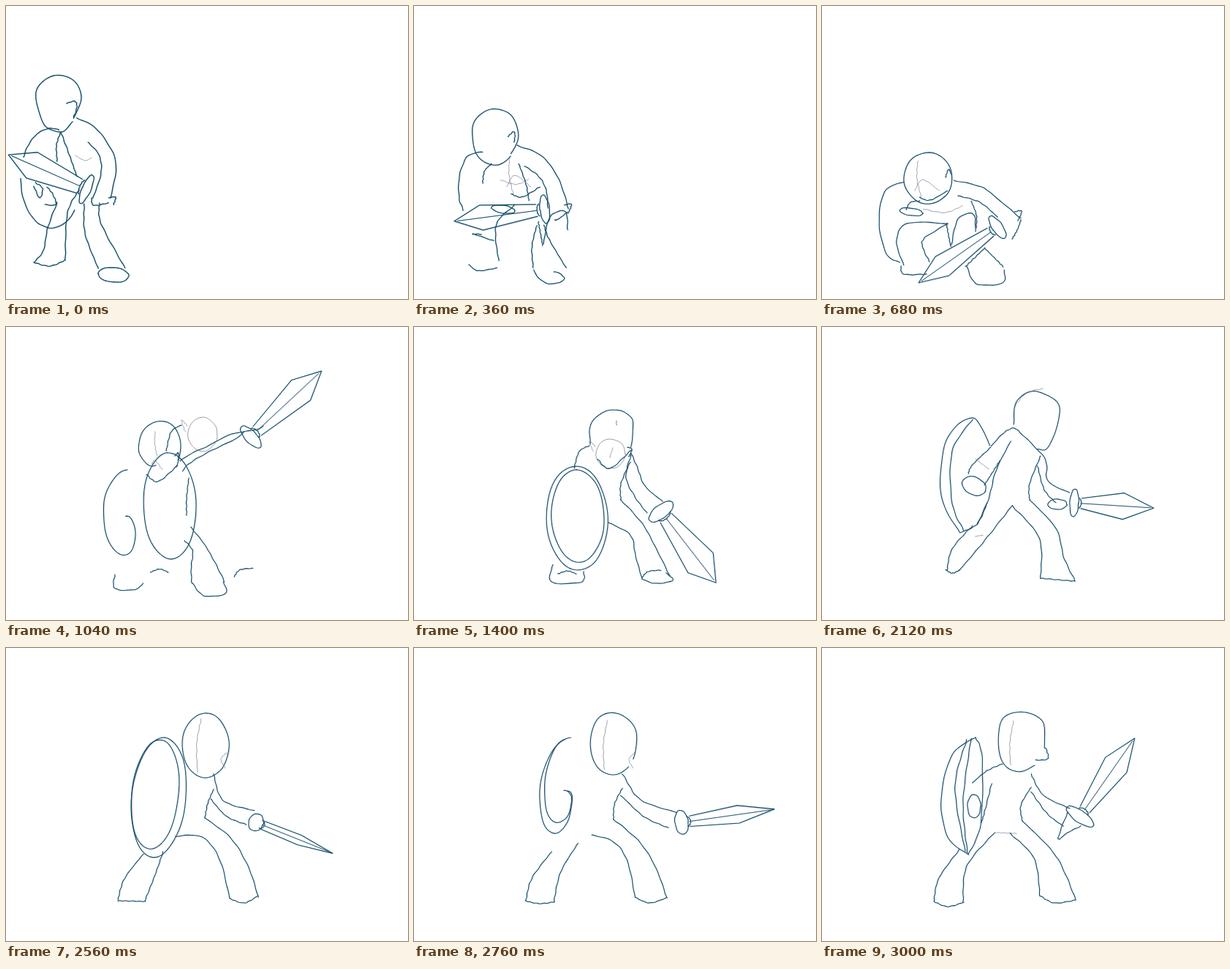
Write an HTML page with a canvas that moves like this. It is 550 px wide and 400 px high and loops after 3.16 s.

```html
<!DOCTYPE html>
<html lang="en">
<head>
<meta charset="utf-8">
<title>Sword and shield sketch</title>
<style>
html, body { margin: 0; width: 100%; height: 100%; overflow: hidden; background: #fff; }
canvas { display: block; width: 550px; height: 400px; }
</style>
</head>
<body>
<canvas id="stage" width="550" height="400"></canvas>
<script>
const LOOP = 3160;
const SAMPLES = 60;
const GROUND = 350;
const ctx = document.getElementById('stage').getContext('2d');

// Moments at which a new drawing replaces the last one.
const STEPS = [0, 120, 240, 360, 480, 600, 680, 800, 880, 960, 1040, 1160,
  1240, 1320, 1400, 1480, 1560, 1640, 1720, 1800, 1880, 2000, 2120, 2240,
  2360, 2440, 2560, 2680, 2760, 2840, 2920, 3000];

// time, hilt x, hilt y, tip x, tip y
const SWING = [
  [0, 110, 250, 3, 203], [680, 240, 302, 132, 378], [880, 272, 225, 215, 110],
  [960, 292, 150, 330, 24], [1040, 335, 150, 432, 60], [1160, 352, 182, 470, 172],
  [1240, 350, 205, 465, 246], [1400, 338, 252, 413, 349], [1720, 345, 245, 449, 292],
  [1880, 352, 242, 467, 270], [2120, 345, 240, 454, 247], [2560, 342, 238, 447, 280],
  [2760, 366, 238, 493, 220], [2840, 360, 236, 453, 180], [3000, 353, 230, 428, 123]];

// time, base half width, belly half width, belly position, guard length, guard depth
const BLADE = [
  [0, 10, 19, 0.7, 21, 6], [680, 7, 16, 0.7, 18, 7], [1400, 10, 22, 0.72, 20, 9],
  [1720, 9, 14, 0.67, 14, 7], [2120, 7, 18, 0.62, 19, 6], [2560, 6, 7, 0.57, 12, 10],
  [3000, 8, 18, 0.66, 22, 8]];

// time, vertical stretch of the body above the ground
const STRETCH = [[0, 1], [240, 1.07], [680, 1], [1160, 1.2], [1400, 1],
  [1560, 1.05], [1720, 1], [3000, 1]];

const mix = (a, b, u) => a + (b - a) * u;

// Neighbouring rows around a time, and the progress between them.
function around(rows, t) {
  let i = rows.length - 1;
  while (i > 0 && rows[i][0] > t) i--;
  const a = rows[i], b = rows[Math.min(i + 1, rows.length - 1)];
  return [a, b, b === a ? 0 : (t - a[0]) / (b[0] - a[0])];
}

function blend(rows, t) {
  const [a, b, u] = around(rows, t);
  return a.slice(1).map((v, i) => mix(v, b[i + 1], u));
}

const each = make => Array.from({ length: SAMPLES + 1 }, (_, k) => make(k / SAMPLES));

function arc(cx, cy, rx, ry, tilt, from, to) {
  const rad = Math.PI / 180, c = Math.cos(tilt * rad), s = Math.sin(tilt * rad);
  return each(f => {
    const a = mix(from, to, f) * rad, x = rx * Math.cos(a), y = ry * Math.sin(a);
    return [cx + x * c - y * s, cy + x * s + y * c];
  });
}

// Smooth curve through x y pairs.
function curve(nums) {
  const last = nums.length / 2 - 1;
  const at = (i, c) => nums[2 * Math.max(0, Math.min(last, i)) + c];
  return each(f => {
    const i = Math.min(Math.floor(f * last), last - 1), v = f * last - i;
    return [0, 1].map(c => {
      const [p, q, r, z] = [-1, 0, 1, 2].map(d => at(i + d, c));
      return q + v / 2 * (r - p + v * (2 * p - 5 * q + 4 * r - z + v * (3 * (q - r) + z - p)));
    });
  });
}

const jagged = line => line.map(([x, y], i) => [x, y - 6 + Math.abs(i % 12 - 6) * 2]);

const keys = [];

// "@" marks an arc, "-" a faint guide line, "jag" a splintered edge.
function pose(time, weight, text) {
  const strokes = {};
  for (const row of text.trim().split('\n')) {
    const [name, ...rest] = row.split(' ');
    const nums = rest.map(Number);
    const line = name.endsWith('@') ? arc(...nums) : curve(nums);
    strokes[name.replace('@', '')] = name.startsWith('jag') ? jagged(line) : line;
  }
  keys.push([time, weight, strokes]);
}

pose(0, 1.35, `
head 93 152 103 126 92 101 66 95 42 113 44 140 54 164 76 172 91 158
ear 83 133 94 130 97 138 92 153
armO 97 153 125 169 150 212 143 262
armI 112 186 127 203 130 228 119 262
hand 117 262 120 272 140 269
hand2 141 262 150 261 147 271
-chest 95 204 108 211 117 207
torsoL 75 172 69 190 70 212
torsoR 75 172 88 207 97 233
shield@ 62 235 42 68 0 -75 -155
shield1@ 62 235 42 68 0 180 40
lhand 40 241 50 249 46 262 38 246
lhand2 56 247 64 257 68 271 53 271
legLo 70 268 57 303 51 334 38 350
legLi 100 251 84 283 81 346
footL 38 350 60 355 81 347
legRi 107 270 108 310 126 358
legRo 128 269 130 297 163 358
footR@ 147 367 21 10 5 180 -180`);

pose(680, 1.15, `
head@ 145 235 33 35 0 45 -315
-face 131 212 130 236 136 262
-face2 127 252 138 237 160 252
ear 169 234 173 223 177 230
jaw 133 261 148 265 172 252
armO 180 238 218 247 240 263 272 290
armI 186 259 216 268 240 288
hand 260 318 267 306 272 292
hand2 263 281 273 280 268 293
-chest 138 277 168 282 192 273
torsoL 134 266 121 268 115 278
torsoR 204 266 211 285 211 303
strap@ 122 281 16 5 8 0 360
shield 112 240 86 253 78 295 88 338 106 350
legLo 112 354 102 322 116 297 172 297
legLi 172 297 140 317 138 330 147 349
footL 108 355 112 366 143 366
thigh 170 297 176 328
knee 177 326 186 291 207 284 210 308
legRo 222 330 248 356
legRi 222 331 196 356
footR 198 355 211 379 247 378 249 360`);

pose(1400, 1.1, `
head 297 164 298 125 270 113 243 130 241 160
-mask@ 269 173 20 20 0 0 360
-face 277 128 277 134
-face2 272 165 268 178
ear 292 164 298 167 294 177
-earL 245 170 240 156 248 163
jaw 251 180 268 193 297 168
shoulder 240 162 226 170 219 193
shield@ 223 261 42 71 -2 -90 -450
shield2@ 224 258 36 63 -2 -90 -450
armO 297 172 306 193 316 217 340 238
armI 297 174 290 205 303 233 319 254
torsoR 296 184 283 214 283 236
legRo 283 236 312 268 330 300 350 340
legRi 266 267 296 284 303 312 312 344
footR 312 344 330 350 354 346 345 336
toeR 312 342 320 334 338 332
footL 190 324 188 348 229 348 232 334
toeL 197 337 210 333 222 337`);

pose(1720, 1.1, `
head 300 140 301 104 271 91 244 104 239 140 252 166
-face 249 131 268 126 284 129
-ear 288 143 300 149 280 161
shoulder 222 182 230 170 254 169
armO 254 169 283 172 302 210 334 230
armI 279 200 294 226 317 246
hand 317 246 320 259 339 260 338 236
torsoL 230 178 219 204 219 230
torsoR 279 202 274 218 272 238
legLo 219 230 186 275 172 336
legLi 232 259 216 280 208 342
footL@ 191 342 19 8 0 180 -180
-crotch 236 257 264 257
legRi 256 257 291 290 307 336
legRo 272 238 322 288 340 333
footR 307 336 325 350 343 340
shield 160 152 151 200 170 307
shield2 175 163 174 250 179 297
crack 157 157 167 144
crack2 186 157 192 138 200 146 203 188
jag 179 185 184 248 199 222 220 205
jag2 179 185 200 196 213 181 224 178`);

pose(2120, 1.1, `
head 295 167 311 162 325 110 294 88 267 100 262 133
-crown 264 108 280 90 303 84
shoulder 231 163 248 145 262 138 272 145
armO 272 145 305 180 309 210 338 226
armI 295 190 304 222 320 240
hand@ 322 242 13 7 0 0 360
torsoL 258 156 238 196 228 234 212 270
torsoR 299 176 284 214 284 236
legLo 206 271 178 303 171 333
legLi 260 244 222 292 188 332
footL 169 331 178 336 188 332
-calf 210 286 220 284
legRo 284 236 320 275 331 315 346 346
legRi 260 244 297 288 299 343
footR 299 343 346 347
shield 230 162 206 124 170 155 163 230 188 280
shield2 206 126 178 170 178 240 194 278
shield4 188 281 212 269 226 240
arm2 231 164 206 188 200 200
arm3 243 183 222 216
lhand@ 208 217 17 12 25 0 360
-cuff 210 180 228 194`);

pose(2560, 1.1, `
head@ 273 133 32 44 0 45 -315
-face 267 97 261 130 262 170
-ear 302 143 294 152 300 164
shield@ 209 204 37 82 6 -90 -450
shield2@ 204 200 32 75 6 -90 -450
armO 284 172 297 208 340 222
armI 280 206 302 230 329 241
torsoR 284 193 276 212 272 232
legRo 272 232 308 260 332 300 345 340
legRi 232 257 268 258 292 288 306 342
footR 306 342 326 348 345 338
legLo 188 281 162 315 153 344
legLi 215 278 203 312 190 345
footL 153 345 191 346`);

pose(3000, 1.1, `
head 304 137 302 101 272 87 244 102 245 152 268 169 291 160
ear 306 136 309 151 292 153
-face 262 100 257 130 258 160
shoulder 247 158 225 168 206 184
armO 286 172 303 201 339 219
armI 286 196 308 226 330 243
hand 336 224 323 260 336 252 354 243
torsoL 232 185 222 225 218 238
torsoR 286 190 272 215 274 236
-crotch 236 252 266 253
legRo 274 236 320 284 347 343
legRi 257 253 290 287 298 338
footR 298 338 318 348 347 344
legLo 188 275 160 314 153 346
legLi 236 252 198 298 193 347
footL 153 346 172 353 194 347
shield 210 122 178 146 163 205 172 258 200 282
shield2 198 125 182 190 196 278
shield3 204 123 193 210 199 280
shield4 210 122 219 150 217 240 200 282
lhand@ 208 216 9 16 0 0 360`);

function heading([, hx, hy, tx, ty]) {
  return [Math.atan2(ty - hy, tx - hx), Math.hypot(tx - hx, ty - hy)];
}

function swordAt(t) {
  const [a, b, u] = around(SWING, t);
  const [angA, lenA] = heading(a), [angB, lenB] = heading(b);
  const turn = Math.atan2(Math.sin(angB - angA), Math.cos(angB - angA));
  return { x: mix(a[1], b[1], u), y: mix(a[2], b[2], u), ang: angA + turn * u, len: mix(lenA, lenB, u) };
}

function trace(pts, colour, width, shift, seed) {
  ctx.strokeStyle = colour;
  ctx.lineWidth = width;
  ctx.beginPath();
  pts.forEach(([x, y], i) => {
    const wob = 0.35 * Math.sin(i * 0.6 + seed);
    ctx.lineTo(x + wob + shift, y + 0.35 * Math.cos(i * 0.5 + seed * 2) + shift * 0.5);
  });
  ctx.stroke();
}

function ink(pts, weight, seed) {
  trace(pts, 'rgba(150, 80, 180, .4)', 0.8, 0.7, seed + 1);
  trace(pts, '#0e5264', weight, 0, seed);
}

function drawSword(t, s, weight) {
  const [base, belly, pos, guard, depth] = blend(BLADE, t);
  const c = Math.cos(s.ang), n = Math.sin(s.ang);
  const place = ([x, y]) => [s.x + x * c - y * n, s.y + x * n + y * c];
  const root = s.len * 0.09, mid = s.len * pos;
  const edge = [[root, -base], [mid, -belly], [s.len, 0], [mid, belly], [root, base]];
  ink(edge.map(place), weight, t);
  ink([[root, 0], [s.len * 0.96, 0]].map(place), weight * 0.8, t + 1);
  ink(arc(0, 0, depth, guard, 0, 0, 360).map(place), weight, t + 2);
  ink(arc(root * 0.6, 0, depth * 0.6, base, 0, -80, 80).map(place), weight, t + 3);
}

function draw(t) {
  const [a, b, u] = around(keys, t);
  const sword = swordAt(t), fromGrip = swordAt(a[0]), toGrip = swordAt(b[0]);
  const [tall] = blend(STRETCH, t);
  const lift = y => GROUND + (y - GROUND) * tall;
  const dx = sword.x - mix(fromGrip.x, toGrip.x, u);
  const dy = sword.y - lift(mix(fromGrip.y, toGrip.y, u));
  const weight = mix(a[1], b[1], u);

  ctx.fillStyle = '#fff';
  ctx.fillRect(0, 0, 550, 400);
  ctx.lineJoin = ctx.lineCap = 'round';
  let seed = t / 40;
  for (const name of new Set([...Object.keys(a[2]), ...Object.keys(b[2])])) {
    const p = a[2][name], q = b[2][name];
    if (!p && u < 0.5 || !q && u >= 0.5) continue;
    const from = p || q, to = q || p;
    // Arms and hand follow the grip of the sword.
    const pts = from.map(([x, y], i) => {
      const pull = /^hand/.test(name) ? 1 : /^arm[OI]/.test(name) ? i / SAMPLES : 0;
      return [mix(x, to[i][0], u) + dx * pull, lift(mix(y, to[i][1], u)) + dy * pull];
    });
    seed += 1.7;
    if (name[0] === '-') trace(pts, '#777c8c', 0.75, 0, seed);
    else ink(pts, weight, seed);
  }
  drawSword(t, sword, weight);
}

const start = performance.now();
let shown = -1;
function tick() {
  const now = (performance.now() - start) % LOOP;
  const step = STEPS.filter(s => s <= now).pop();
  if (step !== shown) draw(shown = step);
  requestAnimationFrame(tick);
}
tick();
</script>
</body>
</html>
```
